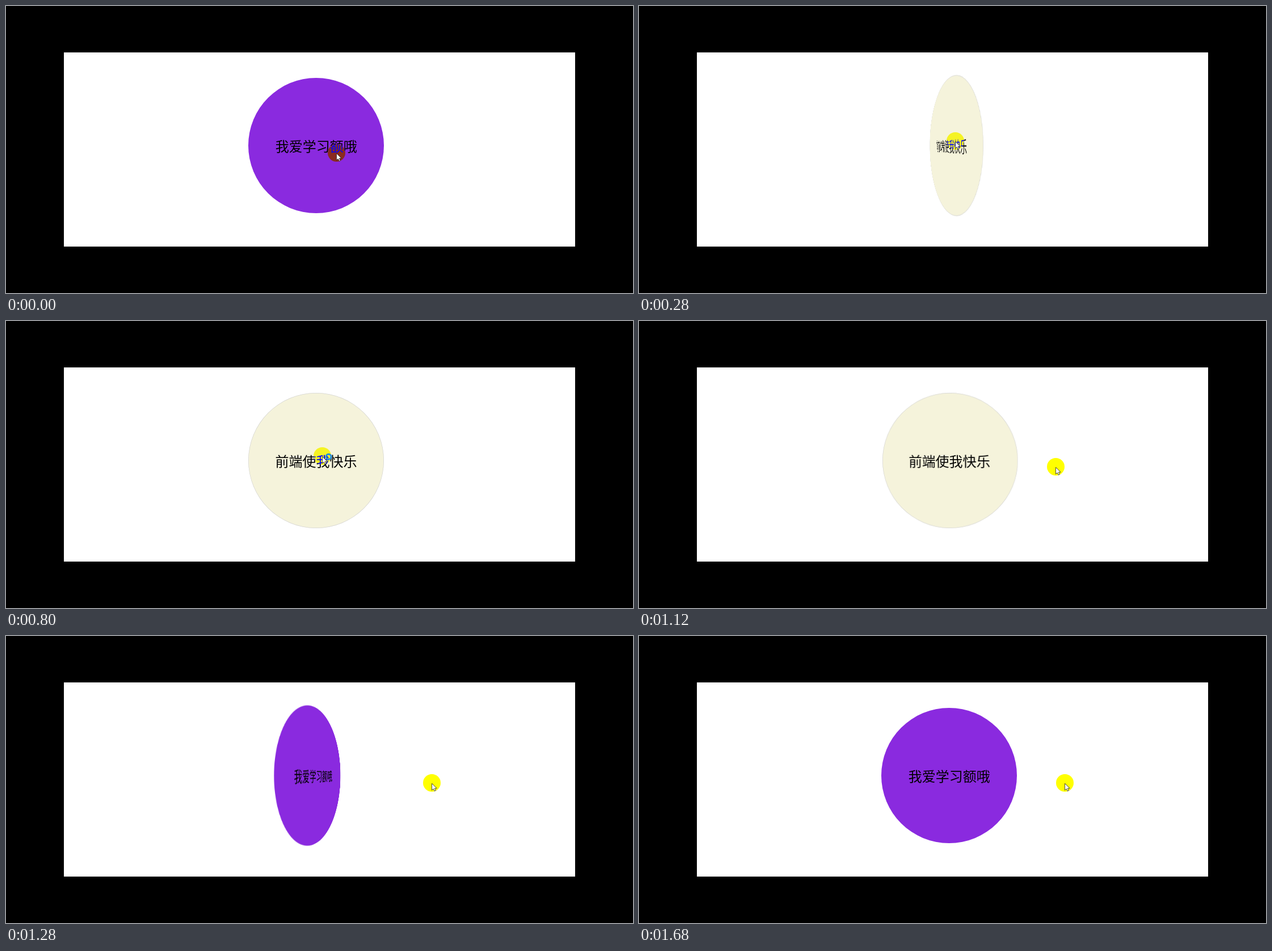
Write an HTML page that moves like this. It is 1105 by 507 pixels and loops after 1.8 s.

```html
<!DOCTYPE html>
<html lang="zh-CN">
<head>
<meta charset="utf-8">
<style>
  html, body { margin: 0; width: 100%; height: 100%; overflow: hidden; background: #000; }
  .panel { position: absolute; left: 102px; top: 82px; width: 901px; height: 343px; background: #fff; }
  .scene { position: absolute; left: 427.3px; top: 126.5px; width: 239px; height: 239px; perspective: 400px; }
  #card { width: 100%; height: 100%; transform-style: preserve-3d; }
  .face {
    position: absolute; inset: 0; border-radius: 50%; backface-visibility: hidden;
    font: 350 24px/239px "Noto Sans CJK SC", "Noto Sans CJK", "Noto Sans CJK JP", sans-serif;
    text-align: center; white-space: nowrap; color: #000;
  }
  .front { background: #8a2adf; }
  .back { background: #f5f3db; box-shadow: inset 0 0 0 .7px #d5d5d5; transform: rotateY(180deg); }
  #halo {
    position: absolute; left: -15px; top: -16px; width: 31px; height: 31px;
    border-radius: 50%; background: #00f; mix-blend-mode: difference;
  }
  #pointer { position: absolute; left: 0; top: 0; overflow: visible; }
</style>
</head>
<body>
<div class="panel"></div>
<div class="scene">
  <div id="card">
    <div class="face front">我爱学习额哦</div>
    <div class="face back">前端使我快乐</div>
  </div>
</div>
<div id="halo"></div>
<svg id="pointer" width="20" height="20">
  <path d="M.5 .5V12.5L3.3 9.9L5.2 14L7.2 13.1L5.4 9.1H9.2Z" fill="#fff" stroke="#222" stroke-width=".8"/>
  <circle id="busy" cx="11.5" cy=".8" r="4.5" fill="none" stroke="#2590dc" stroke-width="3"/>
</svg>
<script>
const LOOP = 1800, STEP = 40, FLIP = 460;
const enter = { x: 582, y: 260 }, rest = { x: 557, y: 239 }, leave = { x: 750, y: 260 };
const [card, halo, pointer, busy] =
  ["card", "halo", "pointer", "busy"].map(id => document.getElementById(id));

const progress = (t, start, length) => Math.min(1, Math.max(0, (t - start) / length));
const easeOut = p => 1 - (1 - p) ** 3;
const mix = (a, b, p) => a + (b - a) * p;

// cubic-bezier(.25, .1, .25, 1), solved by bisection
function ease(x) {
  let lo = 0, hi = 1;
  for (let n = 0; n < 24; n++) {
    const u = (lo + hi) / 2;
    if (.75 * u * (1 - u) + u ** 3 < x) lo = u; else hi = u;
  }
  return .3 * lo * (1 - lo) ** 2 + 3 * lo * lo * (1 - lo) + lo ** 3;
}

function draw(time) {
  const t = Math.floor(time % LOOP / STEP) * STEP;

  const turn = ease(progress(t, 115, FLIP)) - ease(progress(t, 1106, FLIP));
  card.style.transform = `rotateY(${180 * turn}deg)`;

  const arrive = easeOut(progress(t, 0, 120));
  const depart = easeOut(progress(t, 980, 248));
  const [x, y] = ["x", "y"].map(k => mix(mix(enter[k], rest[k], arrive), leave[k], depart));
  halo.style.transform = pointer.style.transform =
    `translate(${Math.round(x)}px, ${Math.round(y)}px)`;
  busy.style.display = t >= 600 && t < 1000 ? "" : "none";
}

const start = performance.now();
function tick() {
  draw(performance.now() - start);
  requestAnimationFrame(tick);
}
tick();
</script>
</body>
</html>
```
